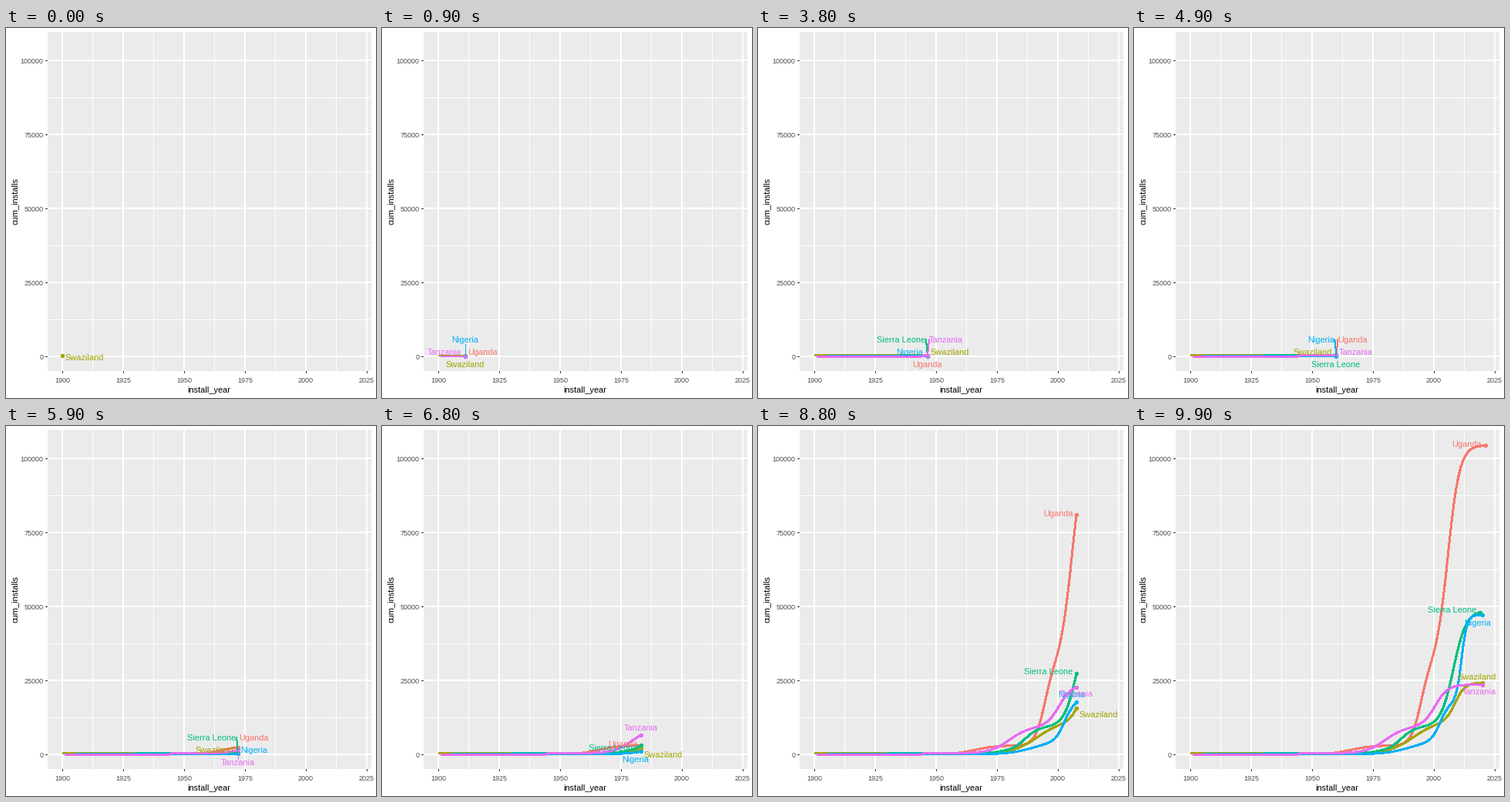
Animation of 480 by 480 pixels, one loop 10 s. Source, as a matplotlib script:

```python
import random
import numpy as np
import matplotlib.pyplot as plt
from matplotlib.animation import FuncAnimation
from matplotlib.patches import Rectangle

SIZE, DPI, FRAMES = 480, 80, 100
PT = 72 / DPI  # one pixel in points
LEFT, RIGHT, TOP, BOTTOM = 54, 474, 5, 445
FIRST, LAST = 1900, 2021

plt.rcParams["font.family"] = "Liberation Sans"


def px(year):
    return 73.2 + (year - FIRST) * 3.16


def py(value):
    return 426.5 - value * 96 / 25000


class Series:
    """A sum of logistic growth waves (height, middle year, width in years)."""

    def __init__(self, ax, z, name, color, span, base, waves, lean, push):
        self.start, self.end = span
        self.base, self.waves = base, waves
        self.lean, self.push = lean, push
        self.line, = ax.plot([], [], color=color, lw=2 * PT, zorder=5 + z,
                             solid_capstyle="butt", antialiased=False)
        self.dot, = ax.plot([], [], "o", color=color, ms=5.4 * PT, mew=0,
                            zorder=15 + z, snap=False)
        self.link, = ax.plot([], [], color=color, lw=PT, zorder=25 + z,
                             antialiased=False)
        self.label = ax.text(0, 0, name, color=color, size=11 * PT,
                             ha="center", va="baseline", zorder=35 + z)
        self.half = self.label.get_window_extent().width / 2

    def value(self, year):
        return self.base + sum(h * (1 + np.tanh((year - mid) / (2 * w))) / 2
                               for h, mid, w in self.waves)

    def head(self, year):
        t = min(year, self.end)
        return px(t), py(self.value(t))

    def show(self, visible):
        for artist in (self.line, self.dot, self.link, self.label):
            artist.set_visible(visible)

    def draw(self, year, cx, cy):
        t = min(year, self.end)
        years = np.append(np.arange(self.start, t), t)
        self.line.set_data(px(years), py(self.value(years)))
        x, y = self.head(year)
        self.dot.set_data([x], [y])

        cx = np.clip(cx, LEFT + 2 + self.half, RIGHT - 4 - self.half)
        cy = np.clip(cy, TOP + 6, BOTTOM - 5)
        self.label.set_position((cx - 0.5, cy + 3.5))
        gap = np.hypot(max(abs(x - cx) - self.half, 0), max(abs(y - cy) - 5, 0))
        self.link.set_data([], [])
        if gap > 9.5:
            sides = [(cx - self.half, cy), (cx + self.half, cy),
                     (cx, cy - 5), (cx, cy + 5)]
            sx, sy = min(sides, key=lambda p: np.hypot(p[0] - x, p[1] - y))
            self.link.set_data([sx, x], [sy, y])


fig = plt.figure(figsize=(SIZE / DPI, SIZE / DPI), dpi=DPI, facecolor="white")
ax = fig.add_axes([0, 0, 1, 1])
ax.set(xlim=(0, SIZE), ylim=(SIZE, 0))
ax.axis("off")
ax.add_patch(Rectangle((LEFT, TOP), RIGHT - LEFT, BOTTOM - TOP,
                       fc="#EBEBEB", ec="none", zorder=0))


def rule(xs, ys, color="white", width=1):
    ax.plot(xs, ys, color=color, lw=width * PT, zorder=1, snap=False,
            solid_capstyle="butt")


def write(x, y, text, size, color="black", ha="center", **kw):
    ax.text(x, y, text, size=size * PT, color=color, ha=ha, va="baseline", **kw)


for k in range(11):
    year = FIRST + 12.5 * k
    x = np.floor(px(year))
    if k % 2:
        rule([x + 0.5] * 2, [TOP, BOTTOM])
    else:
        rule([x] * 2, [TOP, BOTTOM], width=2)
        rule([x + 0.5] * 2, [BOTTOM, BOTTOM + 3], "#333333")
        write(x, 460, f"{year:.0f}", 9, "#4D4D4D")
for k in range(9):
    value = 12500 * k
    y = np.floor(py(value))
    if k % 2:
        rule([LEFT, RIGHT], [y + 0.5] * 2)
    else:
        rule([LEFT, RIGHT], [y] * 2, width=2)
        rule([LEFT - 3, LEFT], [y + 0.5] * 2, "#333333")
        write(48.8, y + 4, str(value), 9, "#4D4D4D", "right")
write(263.5, 473, "install_year", 11)
write(14.8, 225, "cum_installs", 11, rotation=90, rotation_mode="anchor")

# name, colour, years, base, waves, label lean and push
SPECS = [
    ("Uganda", "#F8766D", (1908, 2021), 200,
     [(2900, 1966, 4), (27000, 1994.5, 2), (74500, 2005.7, 2.4)], -1, 2),
    ("Swaziland", "#A3A500", (1900, 2020), 400,
     [(11000, 1991.5, 5), (13000, 2008.7, 2)], 1, 8),
    ("Sierra Leone", "#00BF7D", (1930, 2019), 400,
     [(900, 1975, 3), (8200, 1986.5, 2.8), (39200, 2008, 2.6)], -1, 3),
    ("Nigeria", "#00B0F6", (1905, 2020), 150,
     [(4600, 1990, 5), (13000, 2002.5, 1.8), (29500, 2011.3, 1.1)], -0.3, 10),
    ("Tanzania", "#E76BF3", (1901, 2020), 100,
     [(400, 1944.5, 0.05), (9000, 1980, 4), (14200, 2000.5, 2.6)], 0, 9),
]
series = [Series(ax, z, *spec) for z, spec in enumerate(SPECS)]


def crowded(active, heads, seed):
    """Labels swap places around the shared head at every step."""
    beside = 427.5 if len(active) == 1 else 420.5
    # side (1 right, -1 left), gap to the head, height
    slots = [(1, 4, beside), (0, 0, 436.5), (0, 0, 404.5), (-1, 5, beside)]
    if len(active) == 5:
        slots[2:3] = [(-1, 2, 404.5), (1, 2, 404.5)]
    slots = slots[:len(active)]
    random.Random(seed).shuffle(slots)
    return [(x + side * (gap + s.half), y)
            for s, (x, _), (side, gap, y) in zip(active, heads, slots)]


def spread(active, heads):
    """Each label moves away from the head nearest to its own."""
    spots = []
    for s, (x, y) in zip(active, heads):
        near = min((h[1] for h in heads if h[1] != y), key=lambda v: abs(v - y))
        spots.append((x + s.lean * (4 + s.half), y + s.push * np.sign(y - near)))
    return spots


def update(i):
    year = FIRST + (LAST - FIRST) * i / (FRAMES - 1)
    active = [s for s in series if year >= s.start]
    heads = [s.head(year) for s in active]
    ys = [y for _, y in heads]
    if max(ys) - min(ys) < 10:
        spots = crowded(active, heads, i)
    else:
        spots = spread(active, heads)
    for s in series:
        s.show(s in active)
    for s, spot in zip(active, spots):
        s.draw(year, *spot)
    return []


anim = FuncAnimation(fig, update, frames=FRAMES, init_func=lambda: update(0),
                     interval=100, repeat=True, repeat_delay=0, blit=False)
plt.show()
```
